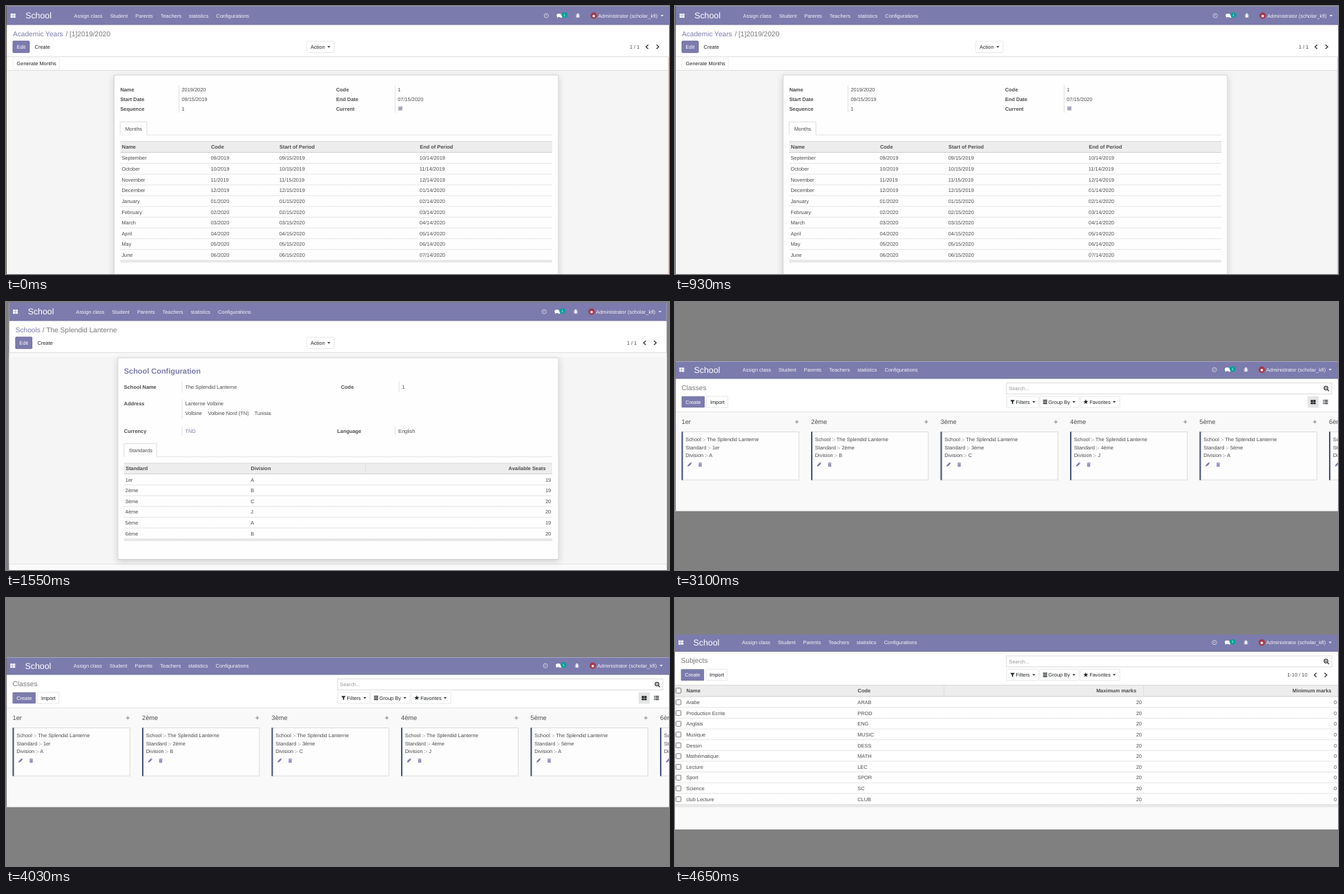
Write an HTML page that moves like this. It is 960x389 px and loops after 6200 ms.

```html
<!DOCTYPE html>
<html lang="en">
<head>
<meta charset="utf-8">
<title>School management</title>
<style>
  html, body { margin: 0; width: 100%; height: 100%; overflow: hidden; background: #808080; }
  svg { display: block; width: 960px; height: 389px; }
  text { font-family: "Liberation Sans", Arial, sans-serif; white-space: pre; text-rendering: geometricPrecision; }
  .scene { visibility: hidden; animation: show 6.2s step-end infinite; }
  @keyframes show {
    0% { visibility: visible; }
    25%, 100% { visibility: hidden; }
  }
</style>
</head>
<body>
<svg id="stage" viewBox="0 0 960 389"></svg>
<script>
const INK = '#4c4c4c', DARK = '#212529', PURPLE = '#7c7bad', GREY = '#777';
const SCHOOL = 'The Splendid Lanterne';
const STEP = 15.62;

// Basic shapes; text y is the middle of the capitals.
const rect = (x, y, w, h, fill, more = '') =>
  `<rect x="${x}" y="${y}" width="${w}" height="${h}" fill="${fill}" ${more}/>`;
const path = (d, fill, more = '') => `<path d="${d}" fill="${fill}" ${more}/>`;
const stroke = (d, color, w = 1, more = '') => path(d, 'none', `stroke="${color}" stroke-width="${w}" ${more}`);
const circle = (x, y, r, fill, more = '') => `<circle cx="${x}" cy="${y}" r="${r}" fill="${fill}" ${more}/>`;
const hline = (x1, x2, y, color = '#d9d9d9') => rect(x1, y, x2 - x1, 0.8, color);
const vline = (x, y1, y2, color = '#dadada') => rect(x, y1, 0.8, y2 - y1, color);
const dots = (x1, x2, y) => stroke(`M${x1} ${y}H${x2}`, '#cfcfcf', 0.8, 'stroke-dasharray="1.2 .6"');
const text = (x, y, s, o = {}) => {
  const size = o.size || 7.42;
  return `<text x="${x}" y="${(y + size * 0.355).toFixed(2)}" font-size="${size}" fill="${o.fill || INK}"` +
    ` font-weight="${o.bold ? 700 : 400}" text-anchor="${o.at || 'start'}">${s}</text>`;
};
const bold = (x, y, s, at) => text(x, y, s, { bold: true, at });
const right = (x, y, s) => text(x, y, s, { at: 'end' });
const each = (list, fn) => list.map(fn).join('');

// Icons
const caret = (x, y, fill = DARK) => path(`M${x - 2.2} ${y - 1.1}h4.4l-2.2 2.3z`, fill);
const chevron = (x, y, dir) =>
  stroke(`M${x - 1.6 * dir} ${y - 3}l${3.2 * dir} 3l${-3.2 * dir} 3`, '#3c3c3c', 1.4);
const tiles = (x, y, fill) => each([[0, 0], [3.8, 0], [0, 3.3], [3.8, 3.3]],
  ([a, b]) => rect(x + a, y - 3 + b, 3.3, 2.8, fill));
const listIcon = (x, y) => each([-2.4, 0, 2.4], d =>
  rect(x - 3.5, y + d - 0.6, 1.4, 1.3, DARK) + rect(x - 1.4, y + d - 0.6, 5, 1.3, DARK));
const lens = (x, y) => circle(x - 0.6, y - 0.6, 2.7, 'none', 'stroke="#333" stroke-width="1.2"') +
  stroke(`M${x + 1.4} ${y + 1.4}l2.4 2.4M${x - 1.9} ${y - 0.6}h2.6`, '#333', 1.2);
const star = (x, y) => {
  let d = '';
  for (let i = 0; i < 10; i++) {
    const a = Math.PI * (i / 5 - 0.5), r = i % 2 ? 1.6 : 3.7;
    d += `${i ? 'L' : 'M'}${(x + r * Math.cos(a)).toFixed(2)} ${(y + r * Math.sin(a)).toFixed(2)}`;
  }
  return path(d + 'z', DARK);
};
const bug = (x, y) => `<ellipse cx="${x}" cy="${y + 0.5}" rx="1.9" ry="2.5" fill="#eeeef6"/>` +
  stroke(`M${x - 3.2} ${y + 0.5}h6.4M${x - 2.8} ${y - 2}l5.6 5M${x + 2.8} ${y - 2}l-5.6 5`, '#eeeef6', 0.7) +
  circle(x, y - 2.1, 1.3, '#eeeef6');
const pencil = (x, y) => path(`M${x - 2.8} ${y + 2.8}l.6-2.3 3.5-3.5 1.7 1.7-3.5 3.5z` +
  `M${x + 1.7} ${y - 3.3}l.5-.2 1.3 1.3-.3.6z`, PURPLE);
const trash = (x, y) => rect(x - 2.7, y - 2.5, 5.4, 0.9, PURPLE) + rect(x - 1, y - 3.2, 2, 0.8, PURPLE) +
  path(`M${x - 2.1} ${y - 1.2}h4.2v4.2h-4.2z`, PURPLE) +
  stroke(`M${x - 0.7} ${y - 0.5}v2.7M${x + 0.7} ${y - 0.5}v2.7`, '#fff', 0.4);

// Top bar: y is its text line, then left ends of icon, brand, menu and shift of the right group
function navbar(x1, x2, top, bottom, y, grid, brand, menu, dx) {
  const items = [['Assign class', 0], ['Student', 52.2], ['Parents', 88.7],
    ['Teachers', 125.3], ['statistics', 166.2], ['Configurations', 205.8]];
  const white = { fill: '#f3f3f8' };
  return rect(x1, top, x2 - x1, bottom - top, PURPLE) + hline(x1, x2, bottom - 0.8, '#6f6e9c') +
    tiles(grid, y, '#fff') +
    text(brand, y, 'School', { size: 12.35, fill: '#fff' }) +
    each(items, ([s, x]) => text(menu + x, y, s, white)) +
    circle(782.3 + dx, y, 3.1, 'none', 'stroke="#d5d5e6" stroke-width=".9"') +
    stroke(`M${782.3 + dx} ${y - 1.8}v2h-1.5`, '#d5d5e6', 0.7) +
    `<ellipse cx="${800.8 + dx}" cy="${y - 0.5}" rx="3.5" ry="2.6" fill="#fff"/>` +
    path(`M${798.5 + dx} ${y + 1}l-.7 2.2 2.6-1.4z`, '#fff') +
    `<ellipse cx="${804 + dx}" cy="${y + 1.2}" rx="2.2" ry="1.8" fill="#fff"/>` +
    rect(804.6 + dx, y - 4.6, 8.2, 7.4, '#00a09d', 'rx="3.4"') +
    text(808.7 + dx, y - 0.9, '1', { size: 5, fill: '#fff', at: 'middle' }) +
    bug(828 + dx, y) +
    circle(851 + dx, y, 4.7, '#a33a4a') + circle(851 + dx, y + 0.6, 1.9, '#f1e4e4') +
    text(857.4 + dx, y, 'Administrator (scholar_kfl)', white) +
    caret(950 + dx, y, '#f3f3f8');
}

const primary = (x, y, w, s, focus) =>
  (focus ? rect(x - 0.8, y - 9, w + 1.6, 18, '#b9b8d6', 'rx="2"') : '') +
  rect(x, y - 8.3, w, 16.6, PURPLE, `rx="1" ${focus ? 'stroke="#62618f" stroke-width=".7"' : ''}`) +
  text(x + w / 2, y, s, { fill: '#fff', at: 'middle' });
const outline = (x, y, w) => rect(x, y - 8.2, w, 16.4, '#fff', 'rx="1" stroke="#e3e3e3" stroke-width=".8"');
const dark = (x, y, s) => text(x, y, s, { fill: DARK });

function formHead(x, link, sepX, rest, pagerX, chevA, chevB) {
  return text(x, 40, link, { size: 10.15, fill: PURPLE }) +
    text(sepX, 40, '/ ' + rest, { size: 10.15, fill: GREY }) +
    primary(x + 0.2, 59.3, 23.5, 'Edit', true) + dark(x + 31.6, 59.3, 'Create') +
    outline(435.6, 59.3, 39.4) + dark(441, 59.3, 'Action') + caret(467.5, 59.3) +
    text(pagerX, 59.3, '1 / 1') + chevron(chevA, 59.3, -1) + chevron(chevB, 59.3, 1);
}

function listHead(x, y, title) {
  const row = y + 20.6;
  return text(x, y - 0.2, title, { size: 10.15, fill: GREY }) +
    primary(x, row, 33.5, 'Create') + outline(x + 36.5, row, 30.5) + dark(x + 41.4, row, 'Import') +
    rect(480, y - 7, 471, 16, '#fff', 'stroke="#d2d2d2" stroke-width=".8"') +
    text(483.5, y + 1.3, 'Search...', { fill: '#9a9a9a' }) + lens(943.2, y + 1.2) +
    outline(480.4, row, 46) + outline(528, row, 57) + outline(587, row, 57) +
    path(`M485.4 ${row - 2.8}h6.6l-2.5 2.9v3.4l-1.6-1.2v-2.2z`, DARK) +
    dark(493.6, row, 'Filters') + caret(519.5, row) +
    each([-2.4, 0, 2.4], d => rect(532.8, row + d - 0.7, 6.2, 1.4, DARK)) +
    dark(540.6, row, 'Group By') + caret(577.6, row) +
    star(594.8, row) + dark(600.2, row, 'Favorites') + caret(636, row);
}

const sheet = (x, y, w, h) => rect(x, y, w, h, '#fefefe',
  'stroke="#cbcbcb" stroke-width=".8" filter="url(#shade)"');
const tab = (x, y, w, s, end) => dots(x + w, end, y + 19) +
  stroke(`M${x} ${y + 19}v-19h${w}v19`, '#d6d6d6', 0.8) + text(x + 7.3, y + 9.8, s);

function table(x1, x2, top, head, rows, foot) {
  const y = top + head;
  return rect(x1, top, x2 - x1, head, '#ededed') + hline(x1, x2, top, '#d4d4d4') + hline(x1, x2, y - 0.6, '#c9c9c9') +
    each(rows, (r, i) => dots(x1, x2, y + STEP * (i + 1))) +
    rect(x1, y + STEP * rows.length, x2 - x1, foot, '#e7e7e7');
}

function yearForm() {
  const names = ['September', 'October', 'November', 'December', 'January',
    'February', 'March', 'April', 'May', 'June'];
  const period = (i, day) => {
    const m = (8 + i) % 12 + 1, year = 8 + i > 11 ? 2020 : 2019, mm = String(m).padStart(2, '0');
    return day ? `${mm}/${day}/${year}` : `${mm}/${year}`;
  };
  return rect(0, 0, 960, 389, '#fff') + rect(1, 93.5, 958, 296, '#f5f5f5') +
    navbar(1, 960, 0.8, 27.3, 14, 6.6, 28.2, 98.5, 0) + rect(0, 0, 960, 0.9, '#8c8b9c') +
    formHead(10, 'Academic Years', 86.4, '[1]2019/2020', 903, 928.3, 943.5) +
    hline(1, 959, 73) + hline(1, 959, 93) +
    rect(10, 75.5, 67.6, 15.8, '#fff', 'stroke="#ececec" stroke-width=".7"') + dark(15.5, 83.5, 'Generate Months') +
    rect(0, 0, 1, 389, '#5f5a50') + rect(958.8, 74, 1.2, 315, '#e6c3bd') +
    sheet(156.4, 100.2, 643.4, 310) +
    vline(250, 115, 155) + vline(563, 115, 155) +
    each([['Name', '2019/2020'], ['Start Date', '09/15/2019'], ['Sequence', '1']], ([a, b], i) =>
      bold(165.4, 121 + 14 * i, a) + text(254.4, 121 + 14 * i, b)) +
    each([['Code', '1'], ['End Date', '07/15/2020'], ['Current', '']], ([a, b], i) =>
      bold(478, 121 + 14 * i, a) + text(567.2, 121 + 14 * i, b)) +
    rect(567.8, 145.6, 6.4, 6.2, '#b9b9cb', 'rx="1"') + stroke('M569.2 148.7l1.3 1.4 2.4-2.8', '#77768f', 0.9) +
    tab(165.4, 168.2, 38.6, 'Months', 791) +
    table(165.4, 791, 196.2, 16.6, names, 3.4) +
    each([['Name', 167.8], ['Code', 297], ['Start of Period', 396], ['End of Period', 599.2]],
      ([s, x]) => bold(x, 204.3, s)) +
    each(names, (s, i) => {
      const y = 220.8 + STEP * i;
      return text(167.4, y, s) + text(296.5, y, period(i)) +
        text(395.7, y, period(i, 15)) + text(598.8, y, period(i + 1, 14));
    });
}

function schoolForm() {
  const rows = [['1er', 'A', 19], ['2ème', 'B', 19], ['3ème', 'C', 20],
    ['4ème', 'J', 20], ['5ème', 'A', 19], ['6ème', 'B', 20]];
  return rect(0, 0, 960, 389, '#808080') + rect(4.6, 1, 952, 388, '#fff') +
    rect(4.6, 73, 952, 307, '#f9f9f9') + rect(4.6, 80, 952, 300, '#f5f5f5') +
    navbar(4.6, 956.6, 0.9, 27.3, 14, 10, 31.7, 101.2, -3.1) +
    formHead(13.8, 'Schools', 52.8, SCHOOL, 899, 924.8, 939.8) +
    hline(4.6, 956.6, 73) + hline(4.6, 956.6, 380) + rect(4.6, 380.8, 952, 8.2, '#fafafa') +
    sheet(162, 81, 638, 292.6) +
    text(170.8, 100.5, 'School Configuration', { size: 10.95, fill: PURPLE, bold: true }) +
    vline(254.5, 116, 131) + vline(568.7, 116, 131) + vline(254.5, 141, 169) +
    vline(254.5, 180, 194) + vline(562.8, 180, 194) +
    bold(170.8, 123, 'School Name') + text(259.4, 123, SCHOOL) +
    bold(485, 123, 'Code') + text(573.5, 123, '1') +
    bold(170.8, 147.5, 'Address') + text(259.4, 147.5, 'Lanterne Volbine') +
    text(259.4, 161.5, 'Volbine') + text(292.4, 161.5, 'Volbine Nord (TN)') + text(359.8, 161.5, 'Tunisia') +
    bold(170.8, 187, 'Currency') + text(259.4, 187, 'TND', { fill: PURPLE }) +
    bold(479.5, 187, 'Language') + text(568, 187, 'English') +
    tab(170.8, 205.7, 47.4, 'Standards', 791) +
    table(170.8, 791, 233.6, 16.3, rows, 3.4) + vline(520, 234, 249.5) +
    bold(173.2, 241.6, 'Standard') + bold(354.6, 241.6, 'Division') + bold(781.7, 241.6, 'Available Seats', 'end') +
    each(rows, ([a, b, n], i) => {
      const y = 258 + 15.58 * i;
      return text(172.8, y, a) + text(354.2, y, b) + right(789.2, y, n);
    });
}

function classBoard() {
  const card = (div, i) => {
    const x = 9.5 + 187.5 * i, std = i ? `${i + 1}ème` : '1er';
    return text(x, 174, std, { size: 9.25 }) +
      stroke(`M${x + 164.4} 174h5M${x + 166.9} 171.5v5`, '#a2a2ae', 1.5) +
      rect(x + 0.4, 188.6, 169.4, 69.6, '#fdfdfd', 'stroke="#d5d5d5" stroke-width=".8"') +
      rect(x, 188.3, 2, 70.2, '#475078') +
      text(x + 5.7, 199, `School :- ${SCHOOL}`) + text(x + 5.7, 211.5, `Standard :- ${std}`) +
      text(x + 5.7, 222.5, `Division :- ${div}`) + pencil(x + 11.4, 236) + trash(x + 27, 236);
  };
  return rect(0, 0, 960, 389, '#808080') + rect(0, 86, 960, 217.3, '#fff') + rect(0, 160, 960, 143.3, '#f9f9f9') +
    navbar(0.8, 960, 86.3, 111.3, 98.2, 6.2, 27.5, 97.8, -1.3) +
    listHead(9.5, 124.4, 'Classes') +
    rect(916, 137, 16, 16.4, '#e4e4e4') + tiles(920.5, 145.2, DARK) + listIcon(941.8, 145) +
    hline(0, 960, 159.3) + rect(0, 86, 0.9, 217.3, '#62605f') +
    each([...'ABCJAB'], card);
}

function subjectList() {
  const rows = [['Arabe', 'ARAB'], ['Production Ecrite', 'PROD'], ['Anglais', 'ENG'], ['Musique', 'MUSIC'],
    ['Dessin', 'DESS'], ['Mathématique', 'MATH'], ['Lecture', 'LEC'], ['Sport', 'SPOR'],
    ['Science', 'SC'], ['club Lecture', 'CLUB']];
  const box = y => rect(1.4, y - 3.7, 7.2, 7.2, '#fff', 'rx=".8" stroke="#6e6e6e" stroke-width=".9"');
  return rect(0, 0, 960, 389, '#808080') + rect(0, 53, 960, 282.8, '#fff') + rect(0, 299, 960, 36.8, '#fafafa') +
    navbar(0, 960, 53, 77.8, 64.6, 5, 26.6, 96.9, -1.3) +
    listHead(8.6, 91, 'Subjects') +
    text(886.5, 111.8, '1-10 / 10') + chevron(927.3, 111.8, -1) + chevron(942.2, 111.8, 1) +
    table(0, 960, 126, 17.2, rows, 4.2) + vline(389, 126, 143) + vline(678, 126, 143) +
    box(134.6) + bold(16.6, 134.6, 'Name') + bold(264.6, 134.6, 'Code') +
    bold(668, 134.6, 'Maximum marks', 'end') + bold(950.4, 134.6, 'Minimum marks', 'end') +
    each(rows, ([name, code], i) => {
      const y = 151.5 + STEP * i;
      return box(y) + text(16.2, y, name) + text(264.2, y, code) + right(676, y, 20) + right(958, y, 0);
    });
}

const scenes = [yearForm, schoolForm, classBoard, subjectList];
document.getElementById('stage').innerHTML =
  `<defs><filter id="shade" x="-5%" y="-5%" width="110%" height="115%">
    <feDropShadow dx="0" dy="2.5" stdDeviation="5" flood-color="#000" flood-opacity=".16"/></filter></defs>` +
  each(scenes, (draw, i) => `<g class="scene" style="animation-delay:${(i * 1.55 - 6.2).toFixed(2)}s">${draw()}</g>`);
</script>
</body>
</html>
```
